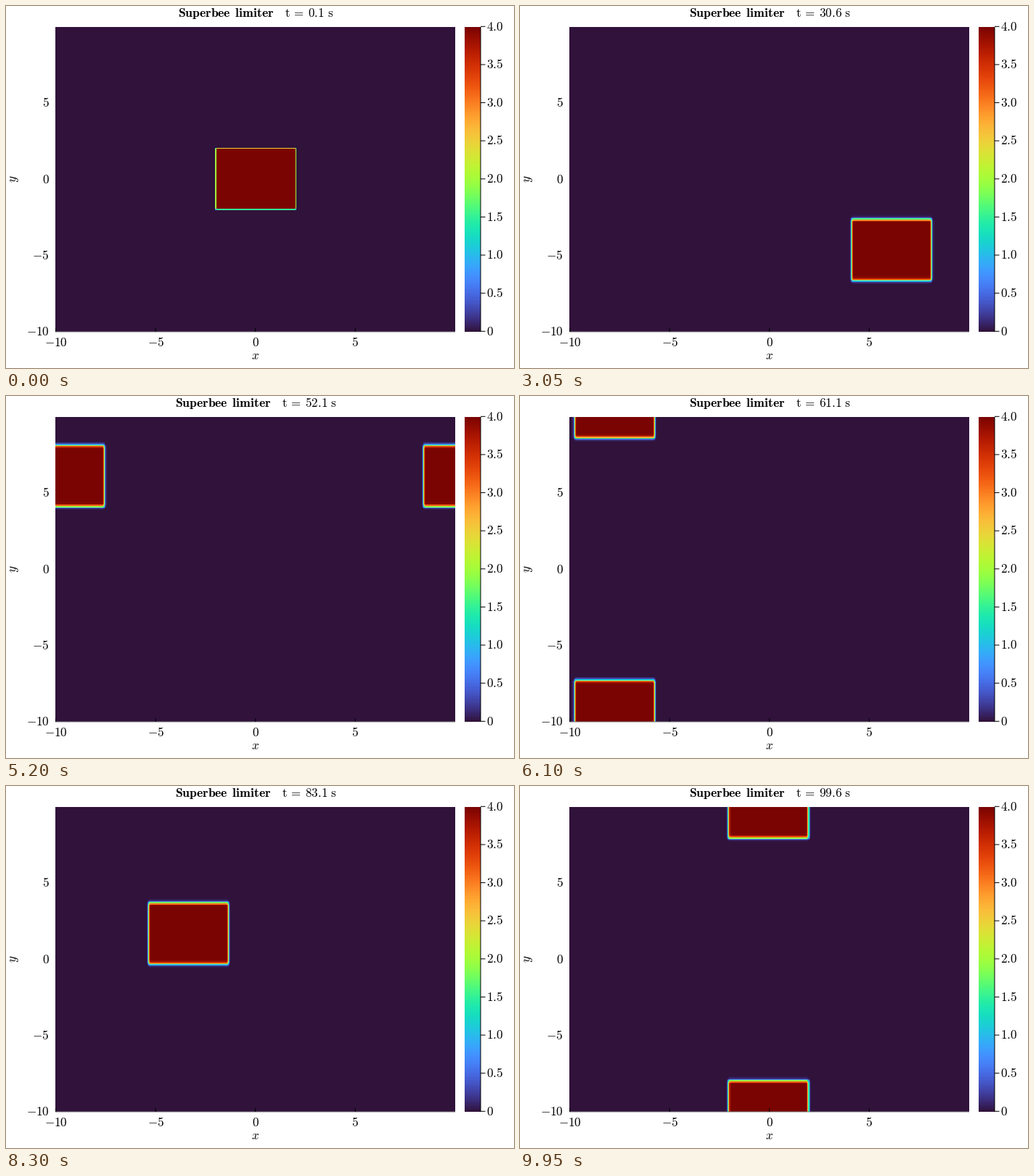
Write a matplotlib script that moves like this. It is 700 px wide and 500 px high and loops after 10000 ms.

```python
import numpy as np
import matplotlib
import matplotlib.pyplot as plt
from matplotlib.animation import FuncAnimation

matplotlib.rcParams["mathtext.fontset"] = "cm"

W, H = 700, 500
PX = 0.72                      # points per pixel at 100 dpi
FRAMES, INTERVAL = 200, 50
DT, SKIP = 0.1, 5              # solver step, steps between pictures
LEFT, RIGHT, TOP, BOTTOM = 68, 619, 29, 450
EM = 17.2


def superbee(r):
    return np.maximum(0, np.maximum(np.minimum(2 * r, 1), np.minimum(r, 2)))


def advect(u, c):
    """One flux-limited Lax-Wendroff step on a periodic row, c > 0."""
    du = np.roll(u, -1) - u
    back = np.roll(du, 1)
    flat = np.abs(du) < 1e-14
    r = np.where(flat, 0, back / np.where(flat, 1, du))
    flux = u + 0.5 * (1 - c) * superbee(r) * du
    return u - c * (flux - np.roll(flux, 1))


def profiles(cells, speed):
    """Row of values for every picture; the last cell repeats the first."""
    h = 20 / cells
    pos = -10 + h * np.arange(cells - 1)
    u = ((pos > -2 - h / 4) & (pos < 2 - h / 4)).astype(float)
    rows = []
    for step in range((FRAMES - 1) * SKIP + 1):
        u = advect(u, speed * DT / h)
        if step % SKIP == 0:
            rows.append(np.append(u, u[0]))
    return rows


across = profiles(500, 0.2)
upward = profiles(250, 0.5)

fig = plt.figure(figsize=(W / 100, H / 100), dpi=100, facecolor="white")
ax = fig.add_axes([0, 0, 1, 1])
ax.axis("off")


def label(x, y, s, size=EM, **kw):
    kw.setdefault("va", "baseline")
    return ax.text(x, y, s, fontsize=size * PX, color="black", **kw)


def line(x0, y0, x1, y1, color="black"):
    ax.plot([x0, x1], [y0, y1], color=color, lw=PX, snap=False,
            solid_capstyle="butt", zorder=3)


def field(n):
    return 4 * np.outer(upward[n], across[n])


heat = ax.imshow(field(0), cmap="turbo", vmin=0, vmax=4, origin="lower",
                 extent=(LEFT, RIGHT, BOTTOM, TOP), aspect="auto",
                 interpolation="nearest")
ax.imshow(np.linspace(0, 1, 256)[:, None], cmap="turbo", origin="lower",
          extent=(632, 654, BOTTOM, TOP), aspect="auto",
          interpolation="nearest")
ax.set_xlim(0, W)
ax.set_ylim(H, 0)

# Axes
line(LEFT, BOTTOM, RIGHT, BOTTOM, color="#777777")
for v in (-10, -5, 0, 5):
    x, y = 343.7 + 27.5 * v, 239 - 21.07 * v
    label(x, 470.5, f"${v}$", ha="center")
    label(59.5, y + 5.6, f"${v}$", ha="right")
    line(x, BOTTOM - 5, x, BOTTOM)
label(343, 488.5, "$x$", ha="center")
label(11.5, 239, "$y$", ha="center", va="center", rotation=90)

# Colour bar scale
line(654, TOP, 654, BOTTOM)
for k in range(9):
    y = 449.3 - 421 * k / 8
    line(654, y, 660.5, y)
    label(662.5, y + 5.3, f"${k / 2:.1f}$" if k else "$0$")

bold = label(0, 15, r"$\mathbf{Superbee\ \,limiter}$", 17.6, ha="center")
clock = label(0, 15, "", 17)


def draw(n):
    t = DT + n * SKIP * DT
    shift = 0 if t < 10 else -4
    heat.set_data(field(n))
    bold.set_x(303.5 + shift)
    clock.set_x(383.5 + shift)
    clock.set_text(rf"$\mathrm{{t\:=\:{t:.1f}\ s}}$")
    return heat, bold, clock


anim = FuncAnimation(fig, draw, frames=FRAMES, interval=INTERVAL,
                     repeat=True, repeat_delay=0, blit=False)
plt.show()
```
